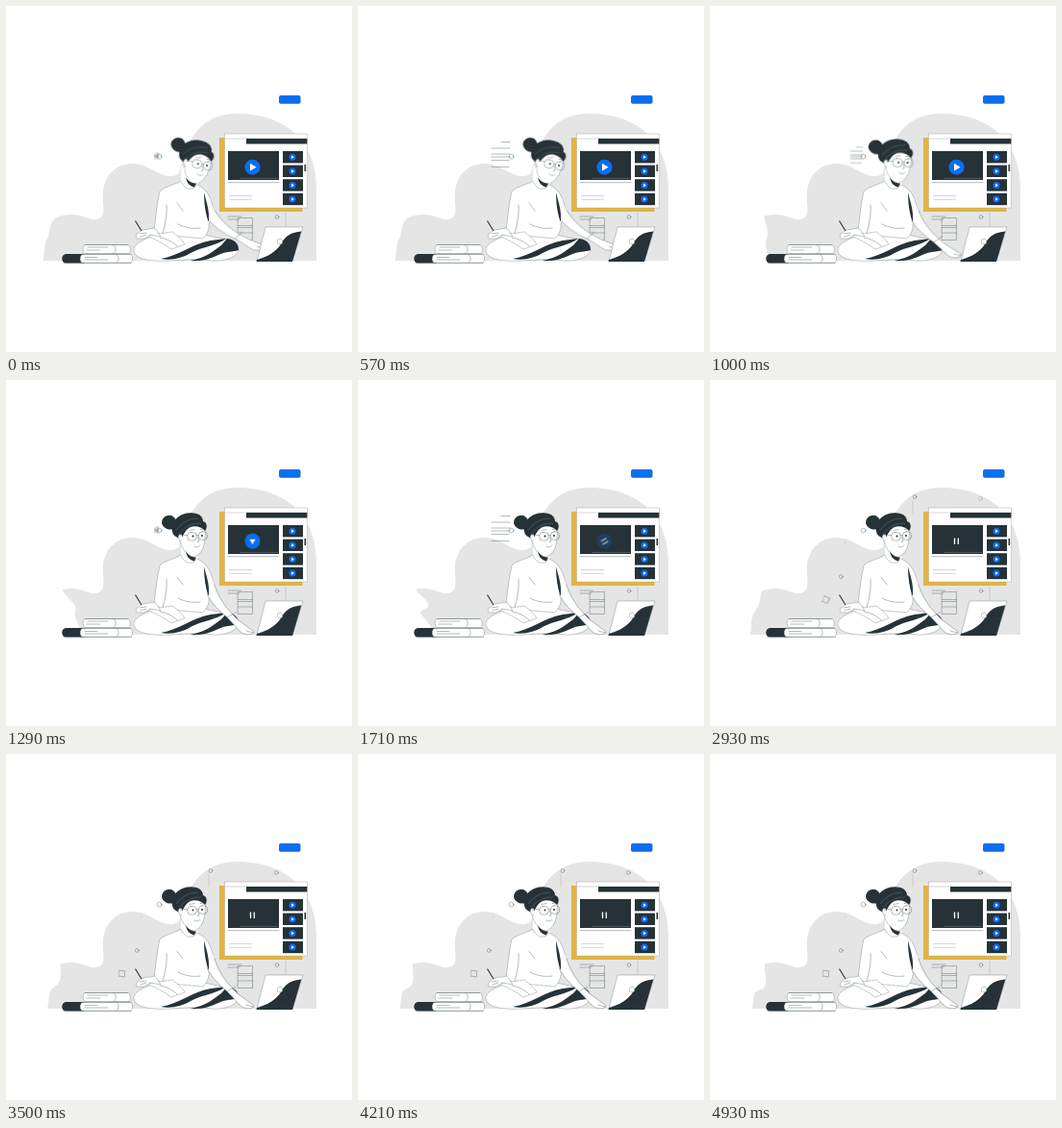
An HTML page for the animation above (5 s loop, 360 by 360 pixels).

```html
<!DOCTYPE html>
<html lang="en">
<head>
<meta charset="utf-8">
<title>Online lesson</title>
<style>
html, body { margin: 0; width: 100%; height: 100%; overflow: hidden; background: #fff; }
svg { display: block; width: 100vw; height: 100vh; }
.ink { fill: #263238; }
.blue { fill: #0b6eee; }
.line { fill: none; stroke: #59686f; stroke-width: .45; stroke-linecap: round; stroke-linejoin: round; }
.body { fill: #fff; stroke: #6d797f; stroke-width: .4; stroke-linejoin: round; }
.soft { fill: none; stroke: #a5a9ab; stroke-width: .45; }
.anim { animation: 5s linear infinite; }

#edge { animation-name: edge; }
#head { transform-origin: 190px 185px; animation-name: head; }
#arm { transform-origin: 216px 212px; animation-name: arm; }
#notes { transform-origin: 159px 156px; animation-name: notes; }
#notes * { vector-effect: non-scaling-stroke; }
#icon, #play { transform-origin: 256.5px 167.7px; }
#icon { animation-name: spin; }
#disc { animation-name: disc; }
#play { animation-name: play; }
#pause { animation-name: pause; }
#tile { transform-origin: 120.5px 228.5px; animation-name: tile; }
#dots { animation-name: dots; }
#late { animation-name: late; }

@keyframes edge {
  0%, 12.8% { d: path("M30 270V210H60C48 217 46 228 44 240C38 250 41 256 38 268Z"); }
  25.8% { d: path("M30 270V210H58C54 224 76 231 72 240C70 246 76 252 78 266Z"); }
  34.2% { d: path("M30 270V210H60C54 224 86 232 68 239C58 244 77 248 78 266Z"); }
  48.6% { d: path("M30 270V210H60C48 217 48 228 45 236C40 248 42 254 41 266Z"); }
  70% { d: path("M30 270V210H60C52 222 62 234 52 241C43 246 46 252 43 266Z"); }
  98.6%, 100% { d: path("M30 270V210H60C52 224 64 238 54 245C43 246 46 254 44 266Z"); }
}
@keyframes head {
  0%, 13% { transform: rotate(14deg); }
  23%, 100% { transform: none; }
}
@keyframes arm {
  0%, 13% { transform: rotate(-15deg); }
  23%, 100% { transform: none; }
}
@keyframes notes {
  0% { transform: scale(.22); }
  11.4%, 15% { transform: none; }
  25.8% { transform: scale(.22); }
  34.2%, 37% { transform: none; }
  48%, 100% { transform: scale(0); }
}
@keyframes spin {
  0%, 20% { transform: none; }
  25.8% { transform: rotate(90deg); }
  34.2% { transform: rotate(240deg); }
  44%, 100% { transform: rotate(360deg); }
}
@keyframes disc {
  0%, 27% { opacity: 1; }
  34.2% { opacity: .2; }
  40%, 100% { opacity: 0; }
}
@keyframes play {
  0%, 20% { opacity: 1; transform: none; }
  25.8% { opacity: 1; transform: scale(.8); }
  31%, 100% { opacity: 0; transform: scale(.3); }
}
@keyframes pause {
  0%, 28% { opacity: 0; }
  34.2% { opacity: .6; }
  42%, 100% { opacity: 1; }
}
@keyframes tile {
  0%, 36% { opacity: 0; transform: rotate(90deg) scale(0); }
  48.6% { opacity: 1; transform: rotate(45deg); }
  66%, 100% { opacity: 1; transform: rotate(8deg); }
}
@keyframes dots { 0%, 36% { opacity: 0; } 46%, 100% { opacity: 1; } }
@keyframes late { 0%, 52% { opacity: 0; } 64%, 100% { opacity: 1; } }
</style>
</head>
<body>
<svg viewBox="0 0 360 360">
  <defs>
    <g id="clip">
      <rect class="ink" x="288" y="151" width="21" height="12.4"/>
      <circle class="blue" cx="298" cy="157.3" r="3.5"/>
      <path d="M297 155.6l3 1.7-3 1.7z" fill="#fff"/>
    </g>
  </defs>

  <!-- backdrop -->
  <path fill="#e5e5e5" d="M38 265C41 255 38 248 43 237C46 226 49 217 68 217C82 217 88 225 97 221C106 216 98 201 102 187C107 169 122 161 140 165C156 170 168 183 180 174C186 150 196 112 240 112C286 112 323 136 323 190V265Z"/>
  <path id="edge" class="anim" fill="#fff" d="M30 270V210H60C48 217 46 228 44 240C38 250 41 256 38 268Z"/>
  <rect class="blue" x="284" y="93" width="22.5" height="8.8" rx="2"/>

  <!-- floating shapes -->
  <g id="dots" class="anim line">
    <circle cx="136.3" cy="204.5" r="1.9"/>
    <circle cx="213" cy="121.5" r="1.9"/>
    <path class="soft" d="M211 125V138M140 168.5l1.5 1"/>
  </g>
  <circle id="late" class="anim line" cx="281.3" cy="123.3" r="1.9"/>
  <rect id="tile" class="anim line" x="117.5" y="225.5" width="6" height="6"/>

  <!-- notes -->
  <g id="notes" class="anim line">
    <path d="M149 141.5H158M139 148H158M139 154H158M139 157H158M139 160.5H157M139 167.5H157"/>
  </g>
  <circle class="line" cx="159.5" cy="156.7" r="2.4"/>

  <!-- video page -->
  <rect x="222" y="137" width="86.5" height="77" fill="#e3b43c"/>
  <rect x="227.5" y="133" width="86" height="77" fill="#fff" stroke="#aaa" stroke-width=".5"/>
  <path class="soft" d="M227.5 138H313.5"/>
  <rect class="ink" x="250" y="138" width="63.3" height="5.5"/>
  <rect class="ink" x="231" y="151" width="53" height="30"/>
  <path class="line" d="M231 183.7H284"/>
  <path d="M243 179.4H283" stroke="#78868d" stroke-width=".5"/>
  <path class="soft" d="M232 197.5H256M232 201.5H256"/>
  <rect class="ink" x="310.5" y="165" width="1.6" height="7"/>
  <use href="#clip"/>
  <use href="#clip" y="14.6"/>
  <use href="#clip" y="29.2"/>
  <use href="#clip" y="43.8"/>
  <g id="icon" class="anim">
    <circle id="disc" class="anim blue" cx="256.5" cy="167.7" r="8"/>
    <path id="play" class="anim" d="M254 163.8l6.6 3.9-6.6 3.9z" fill="#fff"/>
    <path id="pause" class="anim" d="M254.5 164.6v6.4M258.3 164.6v6.4" stroke="#fff" stroke-width="1.3"/>
  </g>

  <!-- desk drawers -->
  <g class="line">
    <path d="M231 219H245M231 222H243"/>
    <path d="M241.5 220.5H256.5V243.5H241.5ZM241.5 228.5H256.5M241.5 230.5H256.5M241.5 236H256.5"/>
    <circle cx="282" cy="219.5" r="1.9"/>
    <path class="soft" d="M291 215V229"/>
  </g>

  <!-- books -->
  <path class="ink" d="M62 258H82V267.4H62C57 267 57 259 62 258Z"/>
  <path class="body" d="M79 258.5H130C132 261 132 265 130 267.2H79C76.5 265 76.5 261 79 258.5Z"/>
  <path class="body" d="M82 248.5H127C130 251 130 255 128 257.5H82C79.5 255 79.5 251 82 248.5Z"/>
  <path class="line" d="M82 248.5H127M79 258.2H130M112 248.5C115 251 115 255 112 257.5M115 258.5C118 261 118 265 115 267M85 251H106M84 254H98M82 261.5H95M82 264H106M60 267.4H130"/>

  <!-- legs -->
  <path class="body" d="M158 238C145 242 132 247 133 255C135 263 147 265 161 265.3C183 265 197 262 214 265C229 266 240 261 242 254C242 246 235 242 224 242L202 237Z"/>
  <path class="ink" d="M161 263C180 260 192 248 213 244L229 242C220 249 203 251 192 257C184 262 173 265 161 263Z"/>
  <path class="ink" d="M192 265C209 262 218 253 224 249L230 242C238 243 242 247 242 254C236 256 229 255 221 259C212 263 203 266 192 265Z"/>

  <!-- neck and torso -->
  <path d="M182 166V184C187 193 197 192 200 187L198 176Z" fill="#fff"/>
  <path class="body" d="M182 182C174 187 164 188 160 193C157 205 156 219 154 233L161 238L205 242C209 238 212 232 211 226C216 222 217 215 215 208C213 198 208 190 199 186C193 193 185 191 182 182Z"/>
  <path class="line" d="M167 207C168 218 165 229 163 237M178 205L184 213M179 227C187 231 194 232 202 231"/>

  <!-- right arm -->
  <g id="arm" class="anim">
    <path fill="#fff" d="M206 194C211 198 215 208 219 219C224 231 232 241 242 250L250 256L258 262C257 265 250 266 245 263L230 247C219 238 211 228 209 222Z"/>
    <path class="line" d="M217 213L219 219C224 231 232 241 242 250L250 256L258 262C257 265 250 266 245 263L230 247C219 238 211 228 209 222M230 247L239 242M250 261L257 263"/>
  </g>
  <path class="ink" d="M206 194C208 203 212 211 211 225C208 218 206 206 206 194Z"/>

  <!-- notebook, left hand and pencil -->
  <path class="body" d="M146 239L173 235C180 240 184 244 186 248L172 253C164 247 156 243 146 239Z"/>
  <path class="body" d="M155 231L143 233C137 235 134 239 136 242L144 242L150 238L161 240Z"/>
  <path class="line" d="M139 237l7-1M140 240l6-2M160 241C168 242 174 246 178 250"/>
  <path d="M134.5 223.5L141 234" stroke="#263238" stroke-width="1.1"/>

  <!-- head -->
  <g id="head" class="anim">
    <path class="body" d="M180 159C180 171 186 181 194 184C201 184 206 176 207 166L208 151L189 148Z"/>
    <path class="ink" d="M173 157C171 146 182 137 195 138.5C202 139 205 143 205 147C209 148 210 153 207 157C204 153 197 151 192 153C187 155 185 161 182 165C177 164 173 161 173 157Z"/>
    <path class="ink" d="M162 149C162 143 167 140 172 141C177 143 179 149 176 154C173 157 164 156 162 149Z"/>
    <path d="M177 156C182 149 190 144 200 144M180 161C185 153 192 149 203 149" fill="none" stroke="#7d898f" stroke-width=".4"/>
    <path class="body" d="M183 161C178 159 178 167 183 168"/>
    <g class="line">
      <rect x="188.7" y="158.5" width="9.6" height="8.6" rx="3.6"/>
      <rect x="200.5" y="157.8" width="9" height="8.6" rx="3.6"/>
      <path d="M198.3 161.5H200.5M188.7 161.5L182 162M191 156.5l5-1M202 155.5l4 .2M199.5 163l1.5 5-2 .5M196 173c2 1.5 4 1 6-.6"/>
    </g>
    <circle class="ink" cx="194.5" cy="162.6" r="1"/>
    <circle class="ink" cx="204" cy="162" r="1"/>
  </g>
  <path class="ink" d="M187 178C189 182 193 184.5 198 184.5L196 188.5C191 187.5 188 184 187 178Z"/>

  <!-- laptop -->
  <path class="body" d="M270 230H309L298 265.5H261Z"/>
  <path class="ink" d="M307.3 234.5C297 235 290 240 286.5 247C281 256 272 261 261 264L260.5 266H298Z"/>
  <rect class="body" x="282.5" y="242.5" width="5" height="5" rx="1.3"/>
</svg>
</body>
</html>
```
